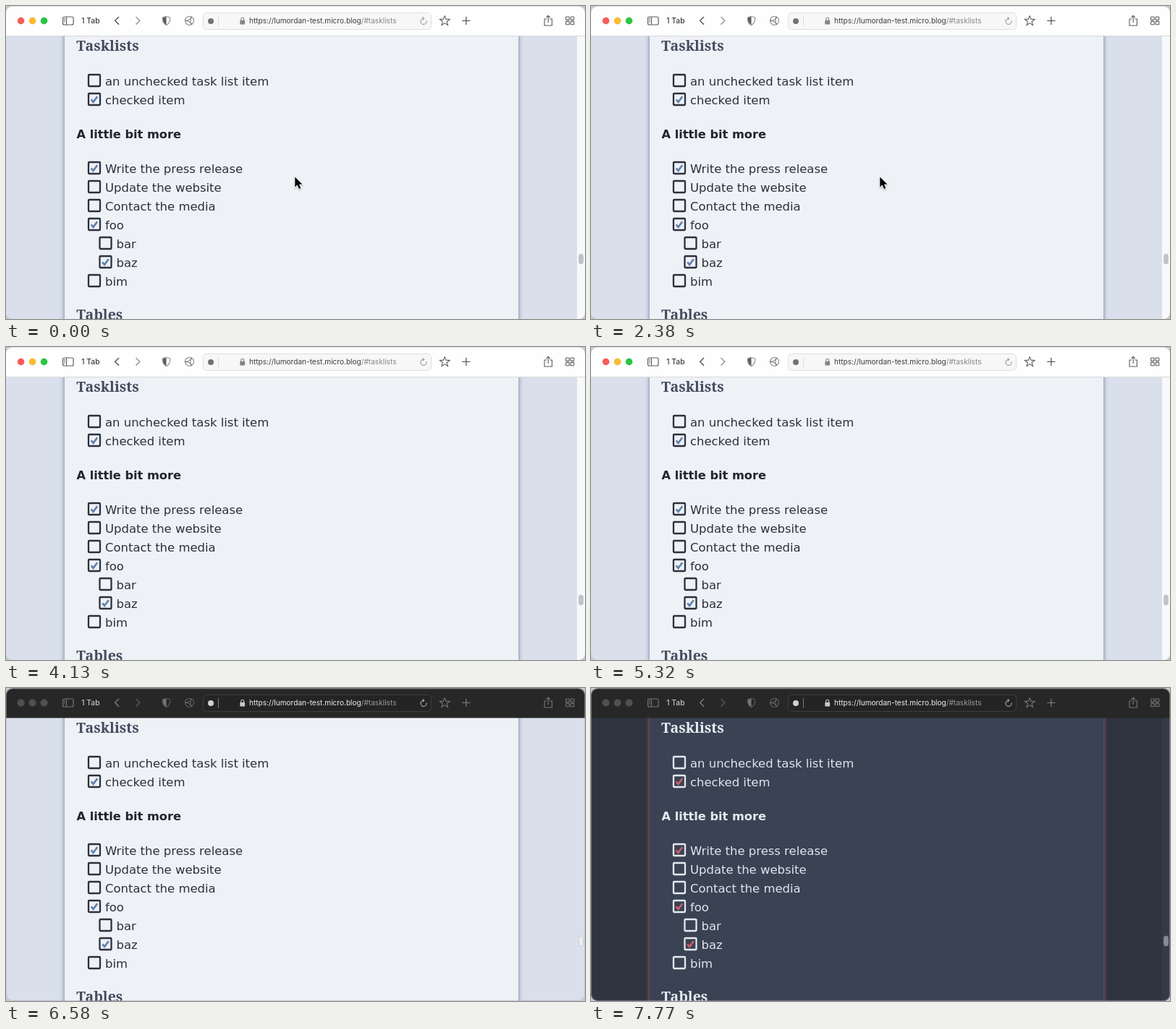
Animation, 800 px wide and 433 px high, one loop 8 s. Source, as an HTML page with a canvas:

```html
<!DOCTYPE html>
<html lang="en">
<head>
<meta charset="utf-8">
<title>Task lists</title>
<style>
html, body { margin: 0; width: 100%; height: 100%; overflow: hidden; background: #c6cad0; }
canvas { display: block; width: 800px; height: 433px; }
</style>
</head>
<body>
<canvas id="stage"></canvas>
<script>
const W = 800, H = 433, LOOP = 8000;
const CURSOR_HIDES = 3290, BAR_DARKENS = 6580, PAGE_DARKENS = 6650;

const SANS = '"DejaVu Sans", sans-serif';
const SERIF = '"Noto Serif", serif';
const UI = 'Inter, sans-serif';

const lightBar = {
  bg: '#fefefe', edge: '#d9d9db', icon: '#5c5c5e', faint: '#9a9a9c', label: '#3a3a3c',
  field: '#f7f7f7', fieldEdge: '#dededf', dot: '#737375', url: '#3c3c3e', path: '#858587',
  lock: '#858587', divider: '#dcdcde', lights: ['#fc5b57', '#fdbc2e', '#28c840'], ring: 'rgba(0,0,0,.12)'
};
const darkBar = {
  bg: '#272727', edge: 'rgba(30,30,30,.45)', icon: '#767676', faint: '#565656', label: '#c6c6c6',
  field: '#242424', fieldEdge: '#3d3d3d', dot: '#d0d0d0', url: '#f0f0f0', path: '#9b9b9b',
  lock: '#c8c8c8', divider: '#777777', lights: ['#505050', '#505050', '#505050'], ring: '#5c5c5c'
};
const lightPage = {
  side: '#dae0eb', sheet: '#eef1f6', glow: '#5f7799', text: '#2b303b', bold: '#20252f',
  head: '#434c5e', box: '#2b303c', tick: '#5e81ac', track: '#f8f9fb', thumb: '#c1c3c7'
};
// the scroll bar fades out while the appearance switches
const fadingPage = { ...lightPage, track: lightPage.side, thumb: '#eceef2', thumbEdge: '#c4c7cd' };
const darkPage = {
  side: '#2e3440', sheet: '#3a4353', glow: '#a8626c', text: '#e0e5ee', bold: '#e5e9f0',
  head: '#e8ecf2', box: '#e5e9f0', tick: '#c9606b', track: '#343a47', thumb: '#858a94'
};

// label, x of the box, y of its centre, checked
const tasks = [
  ['an unchecked task list item', 122, 103, false],
  ['checked item', 122, 129, true],
  ['Write the press release', 122, 224, true],
  ['Update the website', 122, 250, false],
  ['Contact the media', 122, 276, false],
  ['foo', 122, 302, true],
  ['bar', 137.5, 328, false],
  ['baz', 137.5, 354, true],
  ['bim', 122, 380, false]
];

const canvas = document.getElementById('stage');
const ctx = canvas.getContext('2d');
const dpr = window.devicePixelRatio || 1;
canvas.width = W * dpr;
canvas.height = H * dpr;

function text(str, x, y, font, color) {
  ctx.font = font;
  ctx.fillStyle = color;
  ctx.fillText(str, x, y);
  return ctx.measureText(str).width;
}

function rect(x, y, w, h, color) {
  ctx.fillStyle = color;
  ctx.fillRect(x, y, w, h);
}

function round(x, y, w, h, r) {
  ctx.beginPath();
  ctx.roundRect(x, y, w, h, r);
}

function circle(x, y, r) {
  ctx.beginPath();
  ctx.arc(x, y, r, 0, Math.PI * 2);
}

function line(color, width, ...pts) {
  ctx.beginPath();
  pts.forEach(([x, y]) => ctx.lineTo(x, y));
  ctx.strokeStyle = color;
  ctx.lineWidth = width;
  ctx.stroke();
}

function drawTask([label, x, y, checked], c) {
  round(x - 8, y - 8, 16, 16, 1);
  ctx.strokeStyle = c.box;
  ctx.lineWidth = 2.3;
  ctx.stroke();
  if (checked) line(c.tick, 2.6, [x - 4.3, y + 0.4], [x - 1.4, y + 3.8], [x + 4.2, y - 3.8]);
  text(label, x + 15, y + 6.7, `16.45px ${SANS}`, c.text);
}

function drawPage(c) {
  rect(0, 41, W, H - 41, c.side);
  ctx.save();
  ctx.shadowColor = c.glow;
  ctx.shadowBlur = 6 * dpr;
  rect(81, 20, 627, H, c.sheet);
  ctx.restore();

  rect(789, 41, 11, H - 41, c.track);
  round(791.5, 343, 6, 14, 3);
  ctx.fillStyle = c.thumb;
  ctx.fill();
  ctx.strokeStyle = c.thumbEdge || c.thumb;
  ctx.lineWidth = 0.8;
  ctx.stroke();

  text('Tasklists', 97.3, 62.3, `bold 19.5px ${SERIF}`, c.head);
  text('A little bit more', 97.5, 183, `bold 16.2px ${SANS}`, c.bold);
  text('Tables', 97.3, 433.8, `bold 19.5px ${SERIF}`, c.head);
  tasks.forEach(task => drawTask(task, c));
}

function drawIcons(c) {
  const ink = c.icon;
  ctx.strokeStyle = ink;
  ctx.lineWidth = 1.2;

  // sidebar
  round(78.6, 15, 14.5, 11, 2);
  ctx.stroke();
  line(ink, 1.1, [83.6, 15], [83.6, 26]);
  for (const y of [17.5, 19.7, 21.9]) line(ink, 0.9, [80, y], [82.2, y]);

  // back and forward
  line(ink, 1.5, [156, 15], [150.7, 20.3], [156, 25.6]);
  line(c.faint, 1.5, [179.5, 15], [184.8, 20.3], [179.5, 25.6]);

  // shield
  const half = side => {
    ctx.moveTo(221.5, 14.2);
    ctx.lineTo(221.5 + side * 5.2, 16);
    ctx.quadraticCurveTo(221.5 + side * 5.8, 23.5, 221.5, 26.6);
  };
  ctx.beginPath();
  half(-1);
  ctx.fillStyle = ink;
  ctx.fill();
  half(1);
  ctx.lineWidth = 1.2;
  ctx.stroke();

  // wheel
  circle(253.5, 20.3, 6);
  ctx.lineWidth = 1.3;
  ctx.stroke();
  circle(253.5, 20.3, 1.7);
  ctx.stroke();
  for (let i = 0; i < 3; i++) {
    const a = Math.PI + i * Math.PI * 2 / 3, dx = Math.cos(a), dy = Math.sin(a);
    line(ink, 1.2, [253.5 + dx * 2, 20.3 + dy * 2], [253.5 + dx * 6, 20.3 + dy * 6]);
  }

  // star
  const star = [];
  for (let i = 0; i <= 10; i++) {
    const a = -Math.PI / 2 + i * Math.PI / 5, r = i % 2 ? 3 : 7.2;
    star.push([606.2 + r * Math.cos(a), 20.6 + r * Math.sin(a)]);
  }
  line(ink, 1.1, ...star);

  // plus
  line(ink, 1.3, [630.2, 20.3], [641.4, 20.3]);
  line(ink, 1.3, [635.8, 14.7], [635.8, 25.9]);

  // share
  line(ink, 1.1, [747, 18], [744, 18], [744, 27], [754.4, 27], [754.4, 18], [751.4, 18]);
  line(ink, 1.1, [749.2, 23], [749.2, 13.5]);
  line(ink, 1.1, [746.6, 16], [749.2, 13.4], [751.8, 16]);

  // tab overview
  ctx.lineWidth = 1.1;
  for (const x of [773.6, 780.2])
    for (const y of [15, 21.4]) {
      round(x, y, 4.6, 4.4, 0.8);
      ctx.stroke();
    }
}

function drawField(c) {
  round(272.5, 9.5, 315, 23, 5);
  ctx.fillStyle = c.field;
  ctx.fill();
  ctx.strokeStyle = c.fieldEdge;
  ctx.lineWidth = 1;
  ctx.stroke();

  circle(283, 21, 4);
  ctx.fillStyle = c.dot;
  ctx.fill();
  line(c.divider, 1, [293.5, 14], [293.5, 28]);

  // lock
  round(323.3, 19.8, 6.8, 5.6, 1);
  ctx.fillStyle = c.lock;
  ctx.fill();
  ctx.beginPath();
  ctx.arc(326.7, 18.2, 2, Math.PI, 0);
  ctx.lineTo(328.7, 20);
  ctx.moveTo(324.7, 18.2);
  ctx.lineTo(324.7, 20);
  ctx.strokeStyle = c.lock;
  ctx.lineWidth = 1.1;
  ctx.stroke();

  const font = `10.1px ${UI}`;
  const w = text('https://lumordan-test.micro.blog', 336, 24.4, font, c.url);
  text('/#tasklists', 336 + w, 24.4, font, c.path);

  // reload
  ctx.beginPath();
  ctx.arc(577, 21.3, 4, -0.2, Math.PI * 1.55);
  ctx.strokeStyle = c.lock;
  ctx.lineWidth = 1;
  ctx.stroke();
  line(c.lock, 1, [575.6, 15], [577.8, 17.3], [575.4, 19.3]);
}

function drawBar(c) {
  rect(0, 0, W, 41, c.bg);
  rect(0, 41, W, 1, c.edge);
  c.lights.forEach((color, i) => {
    circle(20.6 + i * 16, 20.5, 4.7);
    ctx.fillStyle = color;
    ctx.fill();
    ctx.strokeStyle = c.ring;
    ctx.lineWidth = 0.6;
    ctx.stroke();
  });
  text('1 Tab', 104.3, 24.2, `500 10.3px ${UI}`, c.label);
  drawIcons(c);
  drawField(c);
}

function drawCursor(x, y) {
  ctx.save();
  ctx.translate(x, y);
  ctx.beginPath();
  [[0, 0], [0, 14], [3.2, 11.1], [5.6, 16.6], [8, 15.5], [5.7, 10.2], [10, 10]]
    .forEach(([px, py]) => ctx.lineTo(px, py));
  ctx.closePath();
  ctx.shadowColor = 'rgba(0,0,0,.3)';
  ctx.shadowBlur = 2 * dpr;
  ctx.shadowOffsetY = dpr;
  ctx.strokeStyle = '#fff';
  ctx.lineWidth = 1.8;
  ctx.stroke();
  ctx.shadowColor = 'transparent';
  ctx.fillStyle = '#000';
  ctx.fill();
  ctx.restore();
}

function draw(t) {
  const darkTop = t >= BAR_DARKENS;
  const page = t >= PAGE_DARKENS ? darkPage : darkTop ? fadingPage : lightPage;
  ctx.setTransform(dpr, 0, 0, dpr, 0, 0);
  rect(0, 0, W, H, '#c6cad0');

  ctx.save();
  round(0, 0.6, W, H - 0.6, 9);
  ctx.clip();
  drawPage(page);
  drawBar(darkTop ? darkBar : lightBar);
  ctx.restore();

  if (darkTop) {
    round(0.5, 1, W - 1, H - 1.5, 9);
    ctx.strokeStyle = 'rgba(160,166,176,.5)';
    ctx.lineWidth = 1;
    ctx.stroke();
  }
  if (t < CURSOR_HIDES) drawCursor(399.3, 236.5);
}

function tick() {
  draw(performance.now() % LOOP);
  requestAnimationFrame(tick);
}
tick();
</script>
</body>
</html>
```
